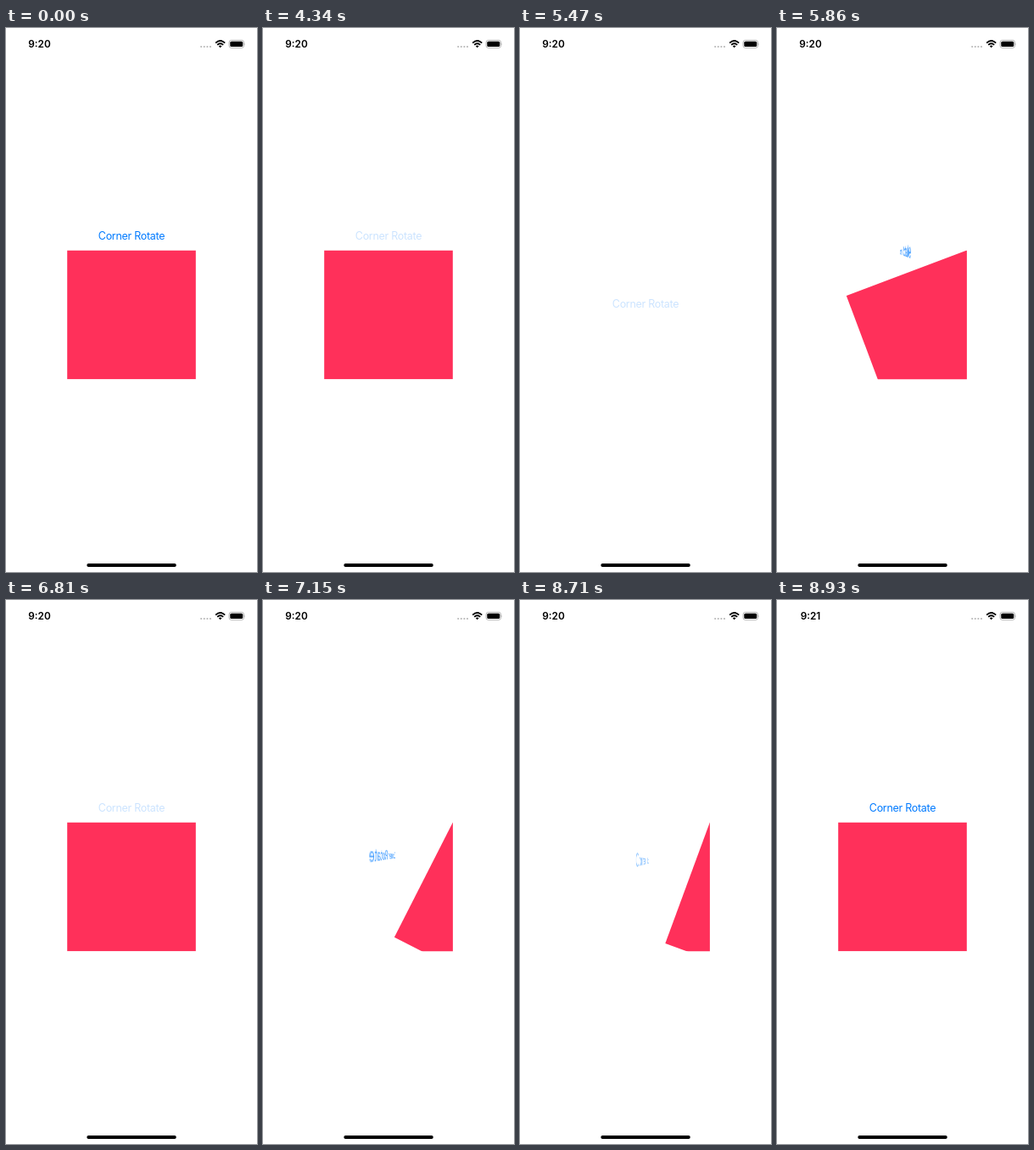
Write an HTML page that moves like this. It is 296 px wide and 640 px high and loops after 9.01 s.

```html
<!DOCTYPE html>
<html lang="en">
<head>
<meta charset="utf-8">
<title>Corner Rotate</title>
<style>
  html, body { margin: 0; width: 100%; height: 100%; overflow: hidden; background: #fff; }
  svg { position: absolute; left: 0; top: 0; }
  #clock { font: 600 11.8px Inter, sans-serif; text-anchor: middle; }
  #button {
    position: absolute; left: 108px; top: 235px; width: 80px; height: 20px;
    display: flex; justify-content: center;
    font: 12.5px/20px Inter, sans-serif; letter-spacing: -.3px;
    white-space: nowrap; color: #007aff;
  }
</style>
</head>
<body>
<svg width="296" height="640" viewBox="0 0 296 640">
  <clipPath id="frame"><rect x="72.1" y="261.5" width="151.8" height="151.8"/></clipPath>
  <text id="clock" x="39.5" y="23.2">9:20</text>

  <g fill="#b8b8b8">
    <circle cx="230.2" cy="22" r="1.1"/><circle cx="233.8" cy="22" r="1.1"/>
    <circle cx="237.4" cy="22" r="1.1"/><circle cx="241" cy="22" r="1.1"/>
  </g>
  <g fill="none" stroke="#000" stroke-width="1.9">
    <path d="M247.2 17.6Q252.7 12.4 258.2 17.6"/>
    <path d="M249.2 19.9Q252.7 16.7 256.2 19.9"/>
  </g>
  <path d="M250.8 21.3Q252.7 19.8 254.6 21.3L252.7 23.3Z"/>
  <rect x="263" y="14.4" width="17.6" height="9" rx="2.7" fill="none" stroke="#a6a6a6" stroke-width=".8"/>
  <rect x="264.3" y="15.7" width="15" height="6.4" rx="1.6"/>
  <path d="M281.5 17.4Q282.7 18.9 281.5 20.4Z" fill="#a6a6a6"/>
  <rect x="95.3" y="630" width="105.5" height="4" rx="2"/>

  <g clip-path="url(#frame)">
    <rect id="square" x="72.1" y="261.5" width="151.8" height="151.8" fill="#ff305a"/>
  </g>
</svg>
<div id="button">Corner Rotate</div>

<script>
const LOOP = 9010, DURATION = 350, CLOCK_CHANGE = 8930;
const [clock, square, button] = ['clock', 'square', 'button'].map(id => document.getElementById(id));

const taps = [
  { press: 4340, start: 4417, hides: true },
  { press: 5470, start: 5626, hides: false },
  { press: 6810, start: 6933, hides: true },
  { press: 8380, start: 8495, hides: false }
];

// The screen only refreshes at these moments.
const refreshes = [0, 4340, 4440, 4540, 4650, 4770, 4890, 5470, 5740, 5860, 5970, 6090,
  6810, 7050, 7150, 7250, 7350, 8380, 8610, 8720, 8825, 8930];

// cubic-bezier(.42, 0, .58, 1)
function easeInOut(x) {
  if (x <= 0) return 0;
  if (x >= 1) return 1;
  let low = 0, high = 1, s;
  for (let i = 0; i < 24; i++) {
    s = (low + high) / 2;
    const at = 3 * s * (1 - s) * (.42 * (1 - s) + .58 * s) + s ** 3;
    if (at < x) low = s; else high = s;
  }
  return s * s * (3 - 2 * s);
}

function draw(time) {
  const t = refreshes.findLast(moment => moment <= time);
  const tap = taps.findLast(({ press }) => press <= t);
  const progress = tap ? easeInOut((t - tap.start) / DURATION) : 1;
  const hidden = tap?.hides ? progress : 1 - progress;

  square.setAttribute('transform', `rotate(${-90 * hidden} 223.9 261.5)`);
  square.style.display = hidden === 1 ? 'none' : '';
  button.style.opacity = .2 + .8 * progress;
  button.style.transform =
    `translateY(${80 * hidden}px) perspective(80px) rotateY(${360 * progress}deg)`;
  clock.textContent = t >= CLOCK_CHANGE ? '9:21' : '9:20';
}

function tick() {
  draw(performance.now() % LOOP);
  requestAnimationFrame(tick);
}
tick();
</script>
</body>
</html>
```
